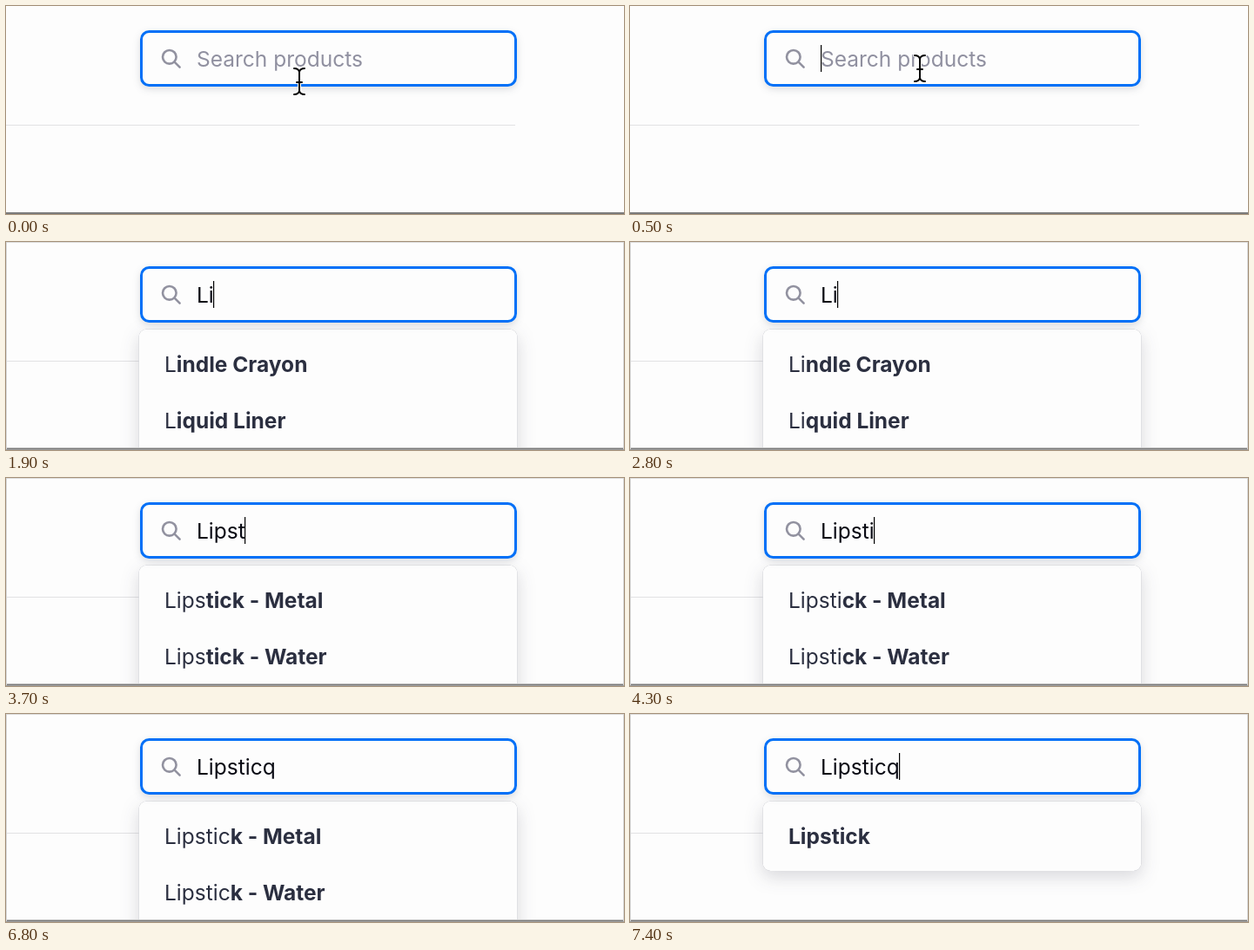
Write an HTML page that moves like this. It is 710x240 px and loops after 8 s.

```html
<!DOCTYPE html>
<html lang="en">
<head>
<meta charset="utf-8">
<title>Search as you type</title>
<style>
  html, body { margin: 0; width: 100%; height: 100%; overflow: hidden; background: #fdfdfd; }
  svg { display: block; width: 710px; height: 240px; }
  text { font: 400 24.5px Inter, "Liberation Sans", sans-serif; font-optical-sizing: none; white-space: pre; }
  .bold { font-weight: 700; }
  .row { fill: #2b2f40; }
  .field { fill: #fdfdfd; stroke: #0070f7; stroke-width: 3; filter: drop-shadow(0 3px 4px rgba(35, 38, 59, .15)); }
  .panel { fill: #fdfdfd; filter: drop-shadow(0 0 .7px rgba(35, 38, 59, .4)) drop-shadow(0 7px 10px rgba(35, 38, 59, .17)); }
  .icon { fill: none; stroke: #9292a0; stroke-width: 2.6; stroke-linecap: round; }
  .pointer path { fill: none; stroke-linecap: round; }
</style>
</head>
<body>
<svg viewBox="0 0 710 240">
  <rect width="710" height="240" fill="#fdfdfd"/>
  <rect y="137" width="585" height="1" fill="#e2e2e4"/>

  <g id="dropdown">
    <rect id="panel" class="panel" x="152.5" y="100.5" width="435" rx="9"/>
    <text class="row" x="182" y="150"><tspan></tspan><tspan class="bold"></tspan></text>
    <text class="row" x="182" y="215"><tspan></tspan><tspan class="bold"></tspan></text>
  </g>

  <rect class="field" x="155.5" y="29.5" width="430" height="62" rx="9"/>
  <g class="icon">
    <circle cx="187.8" cy="58.8" r="7.8"/>
    <path d="M193.6 64.6L199.6 70.6"/>
  </g>
  <text id="placeholder" x="219" y="70" fill="#9090a0">Search products</text>
  <text id="query" x="219" y="70" fill="#090a14"></text>
  <rect id="caret" y="45" width="1.2" height="31" fill="#000"/>

  <rect y="238" width="710" height="2" fill="#7a7a7a"/>
  <g id="frame">
    <rect id="frameTop" y="0" height="1" fill="#dedede"/>
    <rect id="frameLow" y="237" height="1" fill="#c4c4c4"/>
    <rect id="frameEnd" y="239" height="1" fill="#a0a0a0"/>
    <rect x="709" width="1" height="239" fill="#d4d4d4"/>
    <rect id="frameLeft" width="1" height="239" fill="#d4d4d4"/>
  </g>

  <g id="pointer" class="pointer"></g>
</svg>
<script>
const LOOP = 8000;
const TEXT_X = 219;
const $ = id => document.getElementById(id);
const show = (el, on) => el.setAttribute('visibility', on ? 'visible' : 'hidden');

// Each step is [start in ms, value]; a value holds until the next step.
const at = (steps, t) => steps.reduce((value, [start, next]) => t >= start ? next : value, null);

const typed = [
  [0, ''], [1600, 'L'], [1700, 'Li'], [3000, 'Lip'], [3300, 'Lips'],
  [3600, 'Lipst'], [3900, 'Lipsti'], [5100, 'Lipstic'], [6800, 'Lipsticq']
];
const caretOn = [
  [0, false], [400, true], [1000, false], [1600, true], [2300, false], [2800, true],
  [4500, false], [5100, true], [5600, false], [6200, true], [6800, false], [7400, true]
];
const liners = ['Lindle Crayon', 'Liquid Liner'];
const lipsticks = ['Lipstick - Metal', 'Lipstick - Water'];
const results = [
  [0, { items: [], match: 0 }],
  [1900, { items: liners, match: 1 }],
  [2000, { items: liners, match: 2 }],
  [3700, { items: lipsticks, match: 4 }],
  [4000, { items: lipsticks, match: 5 }],
  [4300, { items: lipsticks, match: 6 }],
  [5400, { items: lipsticks, match: 7 }],
  [7100, { items: ['Lipstick'], match: 0 }]
];
const pointerPath = [[0, 337, 87], [500, 333, 72], [900, 332, 70]];

const beam = 'M-6 -15Q-1 -15 0 -11Q1 -15 6 -15M0 -11V11M-6 15Q-1 15 0 11Q1 15 6 15M-3 1H3';
$('pointer').innerHTML =
  `<path d="${beam}" stroke="#fff" stroke-width="4"/><path d="${beam}" stroke="#000" stroke-width="2"/>`;

const rows = [...document.querySelectorAll('.row')];

function drawPointer(t) {
  show($('pointer'), t < 1000);
  const next = pointerPath.findIndex(([time]) => time > t);
  const to = pointerPath.at(next);
  const from = next > 0 ? pointerPath[next - 1] : to;
  const k = to === from ? 0 : (t - from[0]) / (to[0] - from[0]);
  const [x, y] = [1, 2].map(i => from[i] + (to[i] - from[i]) * k);
  $('pointer').setAttribute('transform', `translate(${x} ${y})`);
}

function drawInput(t) {
  const value = at(typed, t);
  $('query').textContent = value;
  show($('placeholder'), !value);
  const width = value ? $('query').getComputedTextLength() : 0;
  $('caret').setAttribute('x', Math.floor(TEXT_X + width));
  show($('caret'), at(caretOn, t));
}

function drawDropdown(t) {
  const { items, match } = at(results, t);
  show($('dropdown'), items.length);
  $('panel').setAttribute('height', items.length === 1 ? 80.5 : 160);
  rows.forEach((row, i) => {
    const label = items[i] || '';
    row.children[0].textContent = label.slice(0, match);
    row.children[1].textContent = label.slice(match);
  });
}

function drawFrame(t) {
  const left = t < 1600 ? 88 : 0;
  $('frame').style.display = t < 1000 ? 'none' : '';
  for (const id of ['frameTop', 'frameLow', 'frameEnd']) {
    $(id).setAttribute('x', left);
    $(id).setAttribute('width', 710 - left);
  }
  $('frameLeft').style.display = left ? 'none' : '';
}

function draw(t) {
  drawPointer(t);
  drawInput(t);
  drawDropdown(t);
  drawFrame(t);
}

const start = performance.now();
function tick() {
  draw((performance.now() - start) % LOOP);
  requestAnimationFrame(tick);
}
tick();
</script>
</body>
</html>
```
